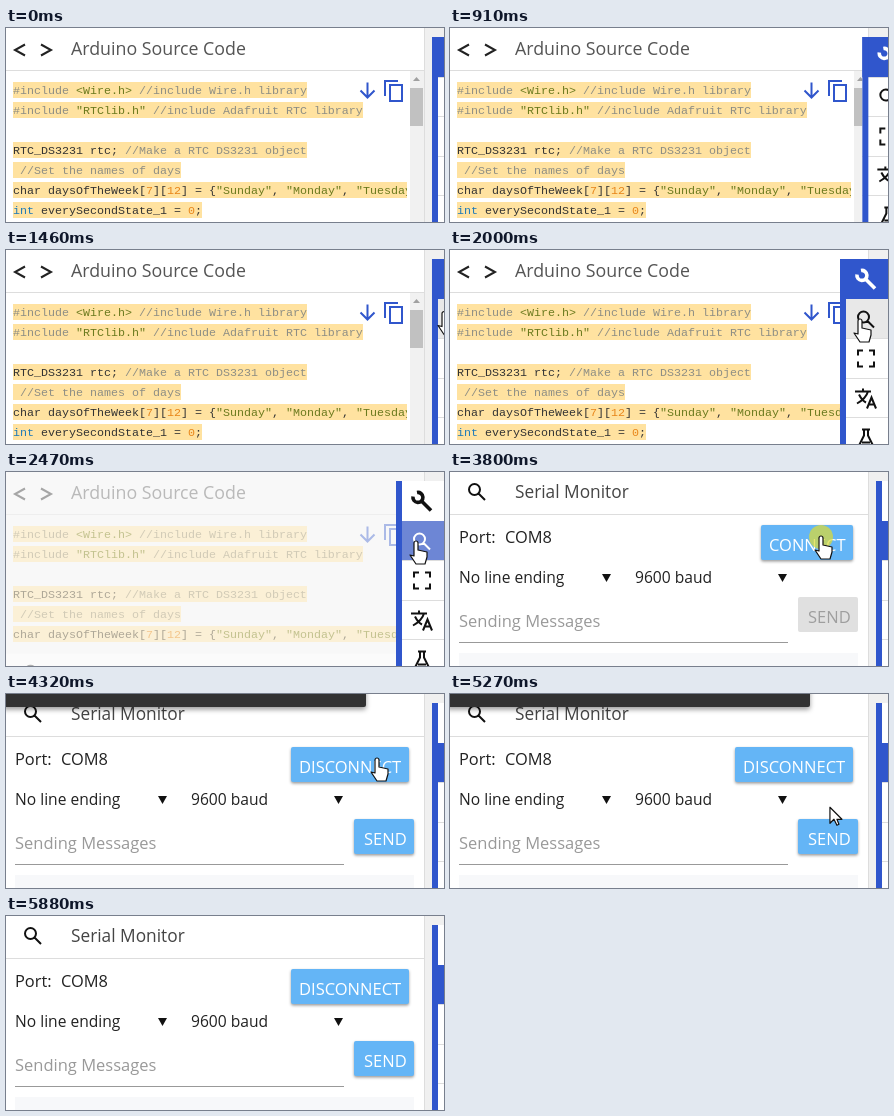
Write an HTML page with a canvas that moves like this. It is 438 by 194 pixels and loops after 6300 ms.

```html
<!DOCTYPE html>
<html lang="en">
<head>
<meta charset="utf-8">
<style>
html, body { margin: 0; width: 100%; height: 100%; overflow: hidden; background: #fff; }
canvas { display: block; }
</style>
</head>
<body>
<canvas id="stage" width="438" height="194"></canvas>
<script>
const g = document.getElementById('stage').getContext('2d');
const LOOP = 6300, STEP = 77.1, START = 760;
const BLUE = '#3056cc', SKY = '#64b5f6', INK = '#222';
const SANS = '"Open Sans", "Noto Sans", sans-serif';
const MONO = '11.667px "Liberation Mono", monospace';
const CHAR = 7, ROW = 20, TAB = 39.5;

// Stroked icons on a 24 unit grid.
const ICONS = {
  wrench: 'M7 3A5 5 0 1 1 3 7M11 11L21 21',
  search: 'M15 9.5a5.5 5.5 0 1 1-11 0a5.5 5.5 0 1 1 11 0M13.5 13.5L20 20',
  expand: 'M4 9V4H9M15 4H20V9M20 15V20H15M9 20H4V15',
  translate: 'M1 5H17M9 2V5M14 5Q12 12 3 17M5 8Q8 14 12 16M13 22L17.5 11L22 22M15 18H20',
  flask: 'M8 4H16M10 4V10L5 20H19L14 10V4M8 17H16',
  copy: 'M3 17V2H16M8 6H20V22H8Z',
  down: 'M12 4V19M5 12L12 19L19 12'
};
const TABS = ['wrench', 'search', 'expand', 'translate', 'flask'];
const HAND = new Path2D('M-2 1a2 2 0 0 1 4 0V8L11 10V15L9 22H0L-6 13L-2 14Z');
const ARROW = new Path2D('M0 0V16L4 12L7 18L9 17L7 12H12Z');

const CODE = [
  '#include <Wire.h> //include Wire.h library',
  '#include "RTClib.h" //include Adafruit RTC library',
  '',
  'RTC_DS3231 rtc; //Make a RTC DS3231 object',
  ' //Set the names of days',
  'char daysOfTheWeek[7][12] = {"Sunday", "Monday", "Tuesday"};',
  'int everySecondState_1 = 0;'
];
// Groups: comment, string, keyword, number; anything else is plain.
const TOKEN = /(#include|\/\/.*)|(<[^>]*>|"[^"]*")|(\bint\b)|(\b\d+\b)|./g;
const TOKEN_COLORS = ['#8e8e84', '#6b7a1e', '#1f7ab8', '#e8861a'];

// Progress from 0 to 1 between two times, straight or smoothed.
const span = (t, from, to) => Math.min(1, Math.max(0, (t - from) / (to - from)));
const ease = (t, from, to) => {
  const p = span(t, from, to);
  return p * p * (3 - 2 * p);
};

function rect(x, y, w, h, color) {
  g.fillStyle = color;
  g.fillRect(x, y, w, h);
}

function text(str, x, y, size, color, weight = 400) {
  g.font = `${weight} ${size}px ${SANS}`;
  g.fillStyle = color;
  g.fillText(str, x, y);
}

function icon(name, cx, cy, color) {
  g.save();
  g.translate(cx - 12, cy - 12);
  g.strokeStyle = color;
  g.lineWidth = name === 'wrench' ? 3.6 : 2;
  g.stroke(new Path2D(ICONS[name]));
  g.restore();
}

function triangle(cx, cy, halfWidth, halfHeight, color) {
  g.fillStyle = color;
  g.beginPath();
  g.moveTo(cx - halfWidth, cy - halfHeight);
  g.lineTo(cx + halfWidth, cy - halfHeight);
  g.lineTo(cx, cy + halfHeight);
  g.fill();
}

function card(x, y, w, h, color, shadow = 3) {
  g.save();
  g.shadowColor = 'rgba(0,0,0,.4)';
  g.shadowBlur = shadow;
  g.shadowOffsetY = shadow / 2;
  g.fillStyle = color;
  g.beginPath();
  g.roundRect(x, y, w, h, 2);
  g.fill();
  g.restore();
}

function button(label, x, y, w, labelX, enabled = true) {
  card(x, y, w, 35, enabled ? SKY : '#e0e0e0', enabled ? 3 : 0);
  text(label, labelX, y + 25.5, 16.5, enabled ? '#fff' : '#9e9e9e');
}

function chevron(cx, direction) {
  g.strokeStyle = INK;
  g.lineWidth = 2;
  g.beginPath();
  for (const side of [-1, 0, 1]) {
    g.lineTo(cx + direction * (side ? -5 : 5), 22 + side * 5.5);
  }
  g.stroke();
}

function codeRow(row, i) {
  const y = 54 + i * ROW;
  rect(CHAR, y, row.length * CHAR, 16, '#ffe2a0');
  for (const token of row.matchAll(TOKEN)) {
    const kind = token.slice(1).findIndex(Boolean);
    g.fillStyle = TOKEN_COLORS[kind] || '#333';
    g.fillText(token[0], CHAR + token.index * CHAR, y + 12);
  }
}

function codePanel(alpha) {
  rect(0, 0, 418, 194, '#f3f3f3');
  g.save();
  g.globalAlpha = alpha;
  rect(0, 0, 418, 194, '#fff');
  rect(0, 42, 418, 1, '#ddd');
  chevron(14, -1);
  chevron(40, 1);
  text('Arduino Source Code', 65, 27, 17.8, '#555');

  g.save();
  g.beginPath();
  g.rect(0, 43, 401, alpha < 1 ? 128 : 151);
  g.clip();
  g.font = MONO;
  CODE.forEach(codeRow);
  g.restore();

  icon('down', 361.5, 51 + 0.5 + 0.5 * 22 , BLUE);
  icon('copy', 388, 63, BLUE);
  rect(404, 43, 14, 151, '#f1f1f1');
  rect(404, 60, 13, 38, '#c1c1c1');
  triangle(410.5, 51, 3.5, -2, '#a0a0a0');
  g.restore();
}

function dropdown(label, x, arrowX) {
  text(label, x, 111, 15.6, INK);
  triangle(arrowX, 106, 4.5, 4, '#111');
}

function serialPanel(t, q) {
  const connected = t >= 3950;
  g.save();
  g.globalAlpha = span(q, 2385, 2600);
  g.translate(0, 194 * (1 - ease(q, 2385, 2850)));
  rect(0, 0, 418, 194, '#fff');
  rect(0, 42, 418, 1, '#ddd');
  icon('search', 27, 20, '#111');
  text('Serial Monitor', 65, 26, 17.3, '#444');
  text('Port:', 9, 71, 16.4, INK);
  text('COM8', 55, 71, 16.4, INK);
  dropdown('No line ending', 9, 156.5);
  dropdown('9600 baud', 185, 332.5);
  text('Sending Messages', 9, 155, 16.5, '#999');
  rect(9, 170, 329, 1, '#999');
  if (connected) button('DISCONNECT', 285, 53, 118, 293);
  else button('CONNECT', 311, 53, 92, 319);
  button('SEND', 348, 125, 60, 358, connected);
  rect(9, 181, 399, 13, '#f7f8fa');
  if (t >= 4320) text('04:05', 16, 202.5, 12.5, INK, 700);
  g.restore();
}

function sidebar(t, q, x) {
  const serial = t >= 2320;
  rect(418, 0, 20, 194, '#f0f0f0');
  rect(418, 0, 1, 194, '#ddd');
  rect(x, 9, 438 - x, 185, '#fff');
  TABS.forEach((name, i) => {
    const y = 9 + Math.round(i * TAB), active = i === (serial ? 1 : 0);
    if (i) rect(x, y, 48, 1, '#ddd');
    if (i === 1 && t >= 1460) rect(x, y, 48, 39, '#e8e8e8');
    if (active) {
      g.globalAlpha = serial ? span(q, 2250, 2560) : 1;
      rect(x, y, 48, 40, BLUE);
      g.globalAlpha = 1;
    }
    icon(name, x + 26, y + 20.5, active ? '#fff' : '#111');
  });
  rect(x, 9, 6, 185, BLUE);
}

function cursor(q, sideX) {
  if (q < 1380) return;
  let x = 440, y = 62;
  const glide = (from, to, toX, toY) => {
    const p = ease(q, from, to);
    x += (toX - x) * p;
    y += (toY - y) * p;
  };
  glide(1380, 1850, 410, 70);
  glide(2500, 2900, 357, 90);
  glide(3100, 3630, 371, 65);
  glide(5050, 5500, 396, 200);

  const overButton = q > 3020 && x < 403 && y < 89;
  const shape = x > sideX || overButton ? HAND : ARROW;
  g.save();
  g.translate(x, y);
  g.fillStyle = '#fff';
  g.strokeStyle = '#111';
  g.lineWidth = 1.2;
  g.lineJoin = 'round';
  g.fill(shape);
  g.stroke(shape);
  g.restore();
}

function clickSpot(x, y) {
  g.fillStyle = 'rgba(222,220,50,.7)';
  g.beginPath();
  g.arc(x, y, 12, 0, 2 * Math.PI);
  g.fill();
}

function draw(t) {
  // Motion advances in even steps; hard changes use the exact time.
  const q = START + Math.floor((t - START) / STEP) * STEP;
  const peek = 22 * Math.sin(Math.PI * span(q, 690, 1380));
  const sideX = 426 - peek - 36 * (ease(q, 1450, 1850) - ease(q, 2790, 3300));

  if (t < 2850) codePanel(t < 2320 ? 1 : 1 - ease(q, 2300, 2570));
  if (t >= 2320) serialPanel(t, q);
  sidebar(t, q, sideX);

  g.globalAlpha = span(q, 2600, 2760) - span(q, 2990, 3300);
  card(226, 50, 155, 38, '#323232', 0);
  text('Serial Monitor Area', 234, 75, 14.8, '#fff', 600);

  if (t < 5880) {
    g.globalAlpha = t < 5810 ? 1 : 0.5;
    card(-4, 13 * ease(q, 3850, 4160) - 40 - 13 * (1 - ease(q, 3850, 4160)) + 0, 364, 40, '#323232', 5);
  }
  g.globalAlpha = 1;

  if (t >= 2150 && t < 2320) clickSpot(408, 70);
  if (t >= 3710 && t < 3950) clickSpot(371, 65);
  cursor(q, sideX);
}

function frame() {
  draw(performance.now() % LOOP);
  requestAnimationFrame(frame);
}
frame();
</script>
</body>
</html>
```
